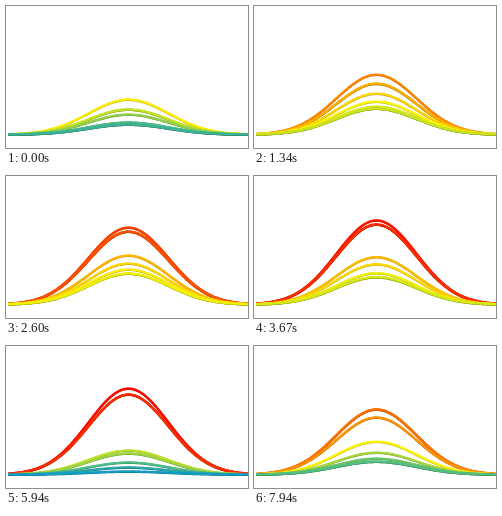
An HTML page with a canvas that plays this animation: 242 by 142 pixels, repeating every 8 s.

```html
<!DOCTYPE html>
<html lang="en">
<head>
<meta charset="utf-8">
<title>Bell curves</title>
<style>
  html, body { margin: 0; width: 100%; height: 100%; overflow: hidden; background: #fff; }
  canvas { display: block; }
</style>
</head>
<body>
<canvas id="stage" width="242" height="142"></canvas>
<script>
const ctx = document.getElementById('stage').getContext('2d');
const LOOP = 8000, STEP = 1000 / 15;
const LEFT = 3, RIGHT = 241, CENTER = 122.5, BASE = 128.5, SIGMA = 40;

// Peak heights of each curve at the key times, tallest curve first.
const times = [0, 1340, 2600, 4670, 5940, 6940, 7940];
const curves = [
  [35, 60, 77, 88, 86, 81, 65],
  [25, 51, 73, 83, 80, 75, 65],
  [25, 51, 73, 83, 80, 67, 57],
  [20, 41, 49, 42, 24, 18, 33],
  [12, 33, 41, 36, 21, 12, 22],
  [12, 28, 35, 25, 12, 7, 16],
  [10, 26, 31, 21, 7, 0, 13],
  [10, 26, 31, 21, 3, 0, 13]
];

// Height to colour: blue, teal, green, lime, yellow, orange, red.
const ramp = [
  [0, 0, 150, 220], [7, 40, 165, 170], [12, 75, 190, 135], [18, 125, 200, 90],
  [24, 190, 225, 40], [33, 255, 245, 0], [45, 255, 200, 0],
  [60, 255, 135, 0], [75, 255, 75, 0], [86, 255, 10, 0], [95, 255, 0, 0]
];

const mix = (a, b, u) => a + (b - a) * u;

function colorAt(height, shade = 1) {
  let i = 0;
  while (i < ramp.length - 2 && height > ramp[i + 1][0]) i++;
  const [from, to] = [ramp[i], ramp[i + 1]];
  const u = (height - from[0]) / (to[0] - from[0]);
  const rgb = [1, 2, 3].map(c => Math.round(mix(from[c], to[c], u) * shade));
  return `rgb(${rgb})`;
}

function slope(values, i) {
  const a = Math.max(0, i - 1), b = Math.min(times.length - 1, i + 1);
  return (values[b] - values[a]) / (times[b] - times[a]);
}

// Smooth cubic through the key heights.
function heightAt(values, t) {
  let i = 0;
  while (i < times.length - 2 && t > times[i + 1]) i++;
  const span = times[i + 1] - times[i];
  const u = Math.min(1, (t - times[i]) / span), v = 1 - u;
  const h = v * v * (1 + 2 * u) * values[i] + u * u * (3 - 2 * u) * values[i + 1]
    + span * u * v * (v * slope(values, i) - u * slope(values, i + 1));
  return Math.max(0, h);
}

function strokeBell(height, dy, width, color) {
  ctx.beginPath();
  for (let x = LEFT; x <= RIGHT; x++) {
    const d = (x - CENTER) / SIGMA;
    ctx.lineTo(x, BASE + dy - height * Math.exp(-d * d / 2));
  }
  ctx.lineWidth = width;
  ctx.strokeStyle = color;
  ctx.stroke();
}

function draw(now) {
  const t = Math.floor((now % LOOP + 5) / STEP) * STEP;
  ctx.fillStyle = '#fff';
  ctx.fillRect(0, 0, 242, 142);
  ctx.lineCap = ctx.lineJoin = 'round';
  for (const values of curves) {
    const h = heightAt(values, t);
    strokeBell(h, 0.4, 2.2, colorAt(h, 0.7));
    strokeBell(h, 0, 2.2, colorAt(h));
  }
}

const start = performance.now();
function tick() {
  draw(performance.now() - start);
  requestAnimationFrame(tick);
}
tick();
</script>
</body>
</html>
```
